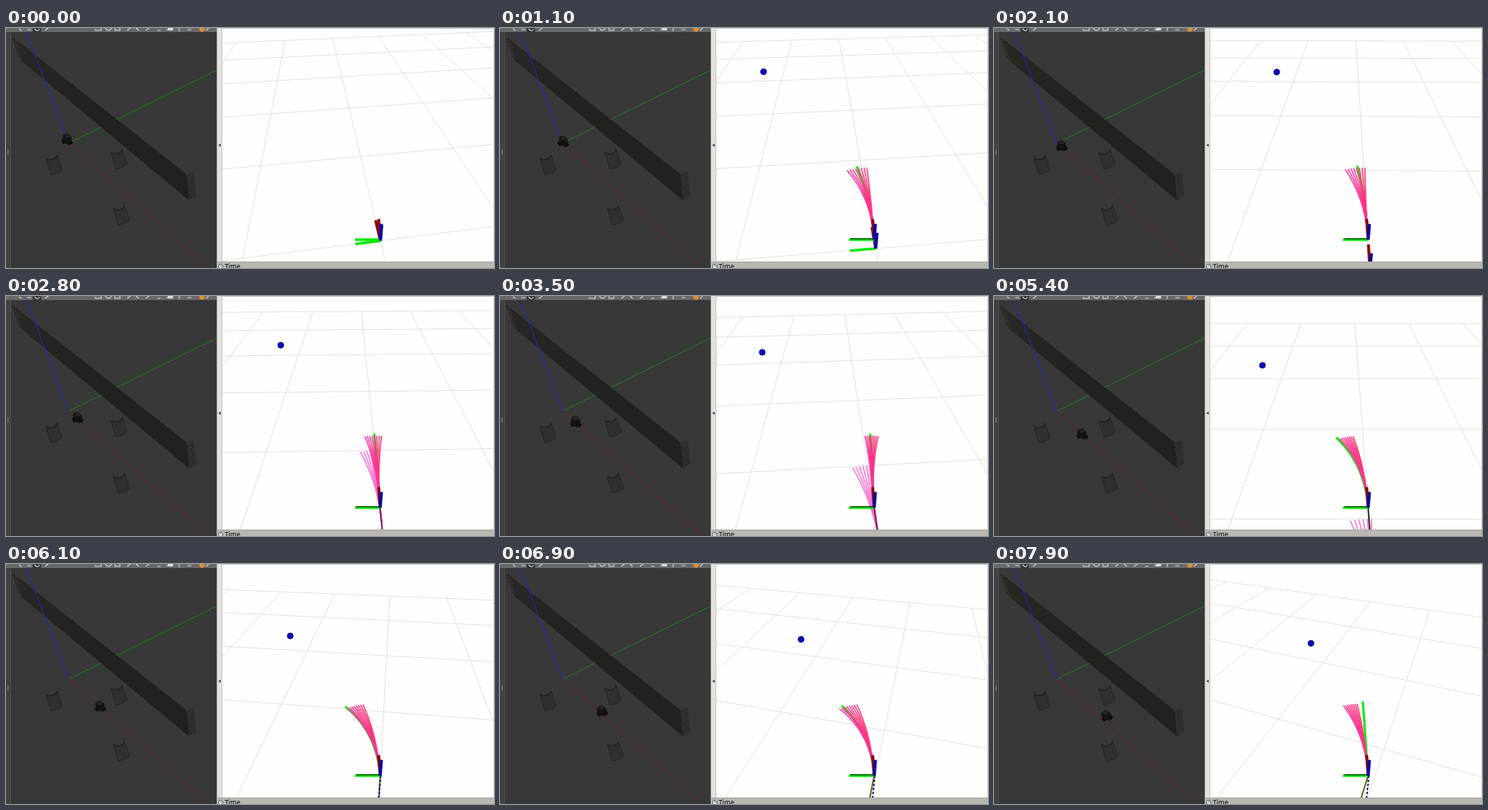
Recreate the animation shown at these times as an HTML page with a canvas. Size 600x296 px, loop 8 s.

```html
<!DOCTYPE html>
<html lang="en">
<head>
<meta charset="utf-8">
<title>Robot simulation and planner view</title>
<style>
  html, body { margin: 0; width: 600px; height: 296px; overflow: hidden; background: #fff; }
  #stage { position: relative; width: 600px; height: 296px; overflow: hidden; }
  svg, canvas { position: absolute; left: 0; top: 0; display: block; }
</style>
</head>
<body>
<div id="stage">
  <canvas id="view" width="600" height="296"></canvas>
  <svg width="600" height="296" viewBox="0 0 600 296">
    <defs>
      <pattern id="mesh" width="3" height="3" patternUnits="userSpaceOnUse" patternTransform="rotate(20)">
        <rect width="3" height="3" fill="#383836"/>
        <path d="M0 .5H3M.5 0V3" stroke="#222220" stroke-width=".8"/>
      </pattern>
      <linearGradient id="wall" x1="0" y1="0" x2="1" y2="1">
        <stop offset="0" stop-color="#292926"/>
        <stop offset=".4" stop-color="#22221f"/>
        <stop offset="1" stop-color="#21211e"/>
      </linearGradient>
      <g id="cup">
        <path d="M-10-8Q0-4 4-12L10 6Q5 11-4 12Z" fill="#30302d"/>
        <path d="M-10-8Q0-4 4-12" fill="none" stroke="#1c1c1a" stroke-width="1.2"/>
        <path d="M-10-8L-4 12Q5 11 10 6L4-12" fill="none" stroke="#242422" stroke-width=".8"/>
      </g>
    </defs>

    <rect width="260" height="296" fill="#383838"/>
    <rect width="5" height="296" fill="#414141"/>
    <path d="M5.5 5V296" stroke="#505050"/>
    <path d="M2.5 150v6" stroke="#888"/>
    <rect width="260" height="5" fill="#696969"/>
    <rect x="33" width="10" height="5" fill="#333"/>
    <g fill="none" stroke="#d4d4d4" stroke-width="1.1">
      <path d="M16 1l3 2M26 2h5M35 1q5 5 6 0M48 3l4-3M110 1v2h7V0M122 0q4 6 8 0M134 0v3h6V0"/>
      <path d="M149 3l4-3M160 0l3 3M172 3l4-3M186 3h4M197 2h8V0M213 0v4M223 2h5M246 3l3-3"/>
    </g>
    <path d="M199 0h6v3h-6z" fill="#ddd"/>
    <circle cx="241" cy="1" r="3.5" fill="#e08a35"/>

    <g fill="none">
      <path d="M77 142L259 52" stroke="#237a23"/>
      <path d="M77 142L249 296" stroke="#652020"/>
    </g>
    <path d="M8 12L222 181L225 212L18 39Z" fill="url(#wall)" stroke="#1b1b19" stroke-width=".7"/>
    <path d="M8 12L14 17L20 41L15 36Z" fill="url(#mesh)"/>
    <path d="M222 181L231 177L234 207L225 212Z" fill="url(#mesh)"/>
    <path d="M25 5L77 142" stroke="#2525cc"/>
    <use href="#cup" x="59" y="169"/>
    <use href="#cup" x="139" y="162"/>
    <use href="#cup" x="142" y="231"/>
    <g id="bot">
      <path d="M-5-5L1-7L5-3L7 4L3 7L-6 4Z" fill="#131313"/>
      <path d="M-4-4L1-6L4-3L-1-1Z" fill="#25252a"/>
      <path d="M-6 2L-3 6M4 6L7 3" stroke="#090909" stroke-width="2"/>
    </g>

    <rect x="259.5" width="6.500" height="296" fill="#e4e2dd"/>
    <path d="M259.5 0V296M265.5 0V288" stroke="#c2c0bc" stroke-width=".8"/>
    <path d="M261 144.500l3-2v4z" fill="#444"/>
    <path d="M266 .5H600" stroke="#c6c4c0"/>
    <path d="M599.5 0V288" stroke="#deddd9"/>
    <rect x="260" y="288" width="340" height="8" fill="#b9b7b0"/>
    <path d="M260 288.500H600" stroke="#aaa8a2"/>
    <circle cx="264" cy="294" r="2.800" fill="#eee" stroke="#555" stroke-width=".8"/>
    <path d="M264 292v2h1.500" fill="none" stroke="#555" stroke-width=".7"/>
    <text x="269" y="296.600" font-family="'Open Sans', 'Noto Sans', sans-serif" font-size="8" font-weight="600" fill="#222">Time</text>
  </svg>
</div>
<script>
const LOOP = 8000, STEP = 100;
const START = 700, FROZEN = 2300;
const GOAL = [3.365, 1.33];

// seconds, robot x, y, yaw, overview x, y, least, greatest and chosen curvature
const KEYS = [
  [0, .01, 0, -.142, 75, 137, .1, .7, .4],
  [.7, .03, 0, -.13, 76, 138, .1, .7, .4],
  [2.1, .23, 0, .009, 83, 145, -.06, .54, .16],
  [3.5, .58, 0, -.07, 93, 155, -.28, .12, -.04],
  [4.5, .855, 0, -.085, 101, 162, .04, .38, .4],
  [5.4, 1.095, 0, 0, 108, 170, .3, .72, .77],
  [6.9, 1.525, .01, .237, 125, 181, .37, .92, .78],
  [7.9, 1.715, .05, .355, 138, 187, .18, .6, 0]
];

const ctx = document.getElementById('view').getContext('2d');
const bot = document.getElementById('bot');

function tangent(i, c) {
  const a = KEYS[Math.max(0, i - 1)], b = KEYS[Math.min(KEYS.length - 1, i + 1)];
  return (b[c] - a[c]) / (b[0] - a[0]);
}

function sample(s) {
  let i = 0;
  while (i < KEYS.length - 2 && s >= KEYS[i + 1][0]) i++;
  const a = KEYS[i], b = KEYS[i + 1], h = b[0] - a[0], u = (s - a[0]) / h;
  return a.map((v, c) => {
    const w = b[c] - v, m = tangent(i, c) * h, n = tangent(i + 1, c) * h;
    return v + u * (m + u * (3 * w - 2 * m - n + u * (m + n - 2 * w)));
  });
}

// Camera rides with the robot: metres ahead, left and up to pixels.
function project([ahead, left, up = 0]) {
  const d = 2.684 + ahead - up * .7586;
  return [432.5 + 437 * (.169 - left) / d, -122 + 1028 * (1 - up / 1.87) / d];
}

function toRobot([x, y, z = 0], pose) {
  const dx = x - pose[1], dy = y - pose[2], c = Math.cos(pose[3]), s = Math.sin(pose[3]);
  return [dx * c + dy * s, dy * c - dx * s, z];
}

function stroke(points, color, width) {
  ctx.beginPath();
  for (const p of points) ctx.lineTo(...project(p));
  ctx.strokeStyle = color;
  ctx.lineWidth = width;
  ctx.stroke();
}

// Straight line on the ground, cut off behind the camera.
function segment(a, b, color, width) {
  const near = -2;
  if (a[0] < near && b[0] < near) return;
  const cut = (p, q) => {
    if (p[0] >= near) return p;
    const u = (near - p[0]) / (q[0] - p[0]);
    return [near, p[1] + u * (q[1] - p[1])];
  };
  stroke([cut(a, b), cut(b, a)], color, width);
}

function grid(pose) {
  for (let i = -5; i <= 5; i++) {
    segment(toRobot([-5, i], pose), toRobot([5, i], pose), '#e3e3e3', 1);
    segment(toRobot([i, -5], pose), toRobot([i, 5], pose), '#e3e3e3', 1);
  }
}

function axes(place) {
  const o = place([0, 0, 0]), size = .19;
  if (o[0] < -1) return;
  stroke([o, place([0, size, 0])], '#00e800', 3.2);
  stroke([o, place([size, 0, 0])], '#8c0505', 3.6);
  stroke([o, place([0, 0, size])], '#0505a5', 3.8);
}

function arc(k, length) {
  const points = [];
  for (let i = 0; i <= 12; i++) {
    const s = length * i / 12, a = k * s;
    points.push(Math.abs(k) < 1e-4 ? [s, 0] : [Math.sin(a) / k, (1 - Math.cos(a)) / k]);
  }
  return points;
}

function bundle(from, pose, count, length, color) {
  const c = Math.cos(from[3]), s = Math.sin(from[3]);
  for (let i = 0; i < count; i++) {
    const u = i / (count - 1), k = from[6] + (from[7] - from[6]) * u;
    const points = arc(k, length).map(([x, y]) =>
      toRobot([from[1] + x * c - y * s, from[2] + x * s + y * c], pose));
    stroke(points.filter(p => p[0] > -1), color(u), 1.4);
  }
}

function trail(t, pose) {
  if (t < 2500) return;
  const color = t < 4000 ? '#741540' : t < 5000 ? '#4a1820' : t < 6000 ? '#222' : '#62621a';
  segment([0, 0], toRobot([0, 0], pose), color, 1.8);
  if (t > 6000) {
    ctx.setLineDash([3, 2]);
    segment([0, -.005], [-.6, .085], '#15158a', 1.8);
    ctx.setLineDash([]);
  }
}

function goal(pose) {
  const [x, y] = project(toRobot(GOAL, pose));
  ctx.beginPath();
  ctx.arc(x, y, 3.6, 0, 7);
  ctx.fillStyle = '#0808c8';
  ctx.fill();
  ctx.strokeStyle = '#050560';
  ctx.lineWidth = .9;
  ctx.stroke();
}

function draw(t) {
  const pose = sample(t / 1000);
  ctx.fillStyle = '#fefefe';
  ctx.fillRect(0, 0, 600, 296);
  grid(pose);

  if (t > FROZEN) bundle(sample(FROZEN / 1000), pose, 6, .73, () => '#f86fd2');
  axes(p => toRobot(p, pose));
  if (t >= START) {
    stroke(arc(pose[8], .84), '#12e812', 2.8);
    bundle(pose, pose, 8, .81, u => `hsl(${342 - 14 * u} 100% 60%)`);
    goal(pose);
  }
  trail(t, pose);
  axes(p => p);
  if (t >= START) stroke([[.008, 0], [.008, .18]], '#143014', 1.2);

  const turn = (pose[3] * -40).toFixed(1);
  bot.setAttribute('transform', `translate(${pose[4].toFixed(2)} ${pose[5].toFixed(2)}) rotate(${turn})`);
}

const begin = performance.now();
function tick() {
  const t = (performance.now() - begin) % LOOP;
  draw(Math.floor(t / STEP) * STEP);
  requestAnimationFrame(tick);
}
tick();
</script>
</body>
</html>
```
